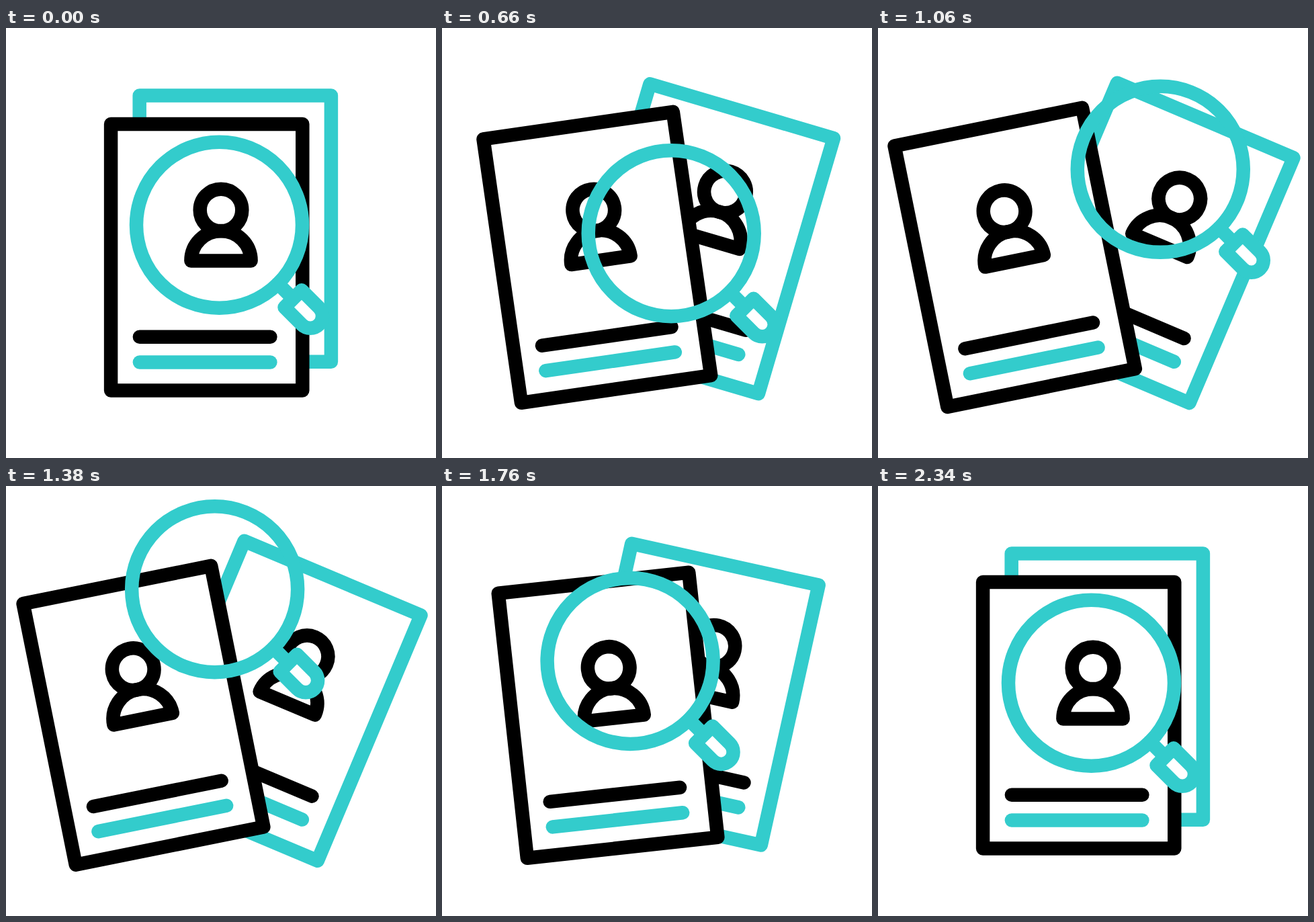
An HTML page for the animation above (2400 ms loop, 640 px wide and 640 px high).

```html
<!DOCTYPE html>
<html lang="en">
<head>
<meta charset="utf-8">
<title>Profile search</title>
<style>
  html, body { margin: 0; height: 100%; overflow: hidden; background: #fff; }
  svg { display: block; width: 100vw; height: 100vh; }
  .ink { stroke: #000; }
  .teal { stroke: #3cc; }
</style>
</head>
<body>
<svg viewBox="0 0 640 640" fill="none" stroke-width="20.5" stroke-linecap="round" stroke-linejoin="round">
  <defs>
    <rect id="sheet" x="-142.6" y="-198.2" width="285.2" height="396.4" fill="#fff"/>
    <g id="person" class="ink">
      <circle cy="-70.3" r="31.3"/>
      <path d="M-44.6 5.2a44.6 44.6 0 0 1 89.2 0z"/>
    </g>
    <g id="lines">
      <path class="ink" d="M-99.8 118.4H94.7"/>
      <path class="teal" d="M-99.8 156.2H94.7"/>
    </g>
  </defs>
  <g id="back">
    <use href="#sheet" class="teal"/>
    <use href="#person" x="10.2" y="-5.6"/>
    <use href="#lines" x="3" y="-5.6"/>
  </g>
  <g id="front">
    <use href="#sheet" class="ink"/>
    <use href="#person" id="slider"/>
    <use href="#lines"/>
  </g>
  <g id="lens" class="teal">
    <circle r="123.5"/>
    <g transform="rotate(45)">
      <path d="M123.5 0H155"/>
      <path d="M155.2 -18H191.6a18 18 0 0 1 0 36H155.2z" fill="#fff"/>
    </g>
  </g>
</svg>
<script>
const LOOP = 2400, TURN = 1200, END = 2340;
const [back, front, slider, lens] =
  ['back', 'front', 'slider', 'lens'].map(id => document.getElementById(id));

const cubic = (a, b, c, d, s) => {
  const r = 1 - s;
  return r * r * r * a + 3 * r * r * s * b + 3 * r * s * s * c + s * s * s * d;
};

// Ease in-out: cubic-bezier(.8, 0, .2, 1)
function ease(x) {
  let lo = 0, hi = 1;
  for (let i = 0; i < 24; i++) {
    const mid = (lo + hi) / 2;
    if (cubic(0, 0.8, 0.2, 1, mid) < x) lo = mid; else hi = mid;
  }
  return cubic(0, 0, 1, 1, lo);
}

// Lens sweep: time, x, y, velocity x, velocity y
const sweep = [
  [440, 0, 0, 0, 0],
  [660, 23.5, 12.5, 0.22, 0.03],
  [1060, 103, -82.5, -0.22, -0.34],
  [1380, -6.5, -139.5, -0.37, 0.06],
  [1760, -37.5, -33, 0.1, 0.195],
  [2240, 0, 0, 0, 0]
];

function lensOffset(t) {
  const i = sweep.findIndex(key => key[0] > t);
  if (i < 1) return [0, 0];
  const from = sweep[i - 1], to = sweep[i], span = to[0] - from[0];
  return [1, 2].map(k => cubic(
    from[k], from[k] + from[k + 2] * span / 3,
    to[k] - to[k + 2] * span / 3, to[k], (t - from[0]) / span));
}

const place = (el, x, y, angle = 0) =>
  el.setAttribute('transform', `translate(${x} ${y}) rotate(${angle})`);

function draw(now) {
  const t = now % LOOP;
  const spread = t < TURN ? ease(t / TURN)
    : 1 - ease(Math.min(1, (t - TURN) / (END - TURN)));
  place(back, 341.3 + 69 * spread, 298.6 + 21.5 * spread, 23.2 * spread);
  place(front, 298.7 - 95.8 * spread, 341.3, -11.57 * spread);
  place(slider, 21.3 - 23.1 * spread, 0);
  const [x, y] = lensOffset(t);
  place(lens, 317.5 + x, 293.2 + y);
}

const start = performance.now();
function tick() {
  draw(performance.now() - start);
  requestAnimationFrame(tick);
}
tick();
</script>
</body>
</html>
```
